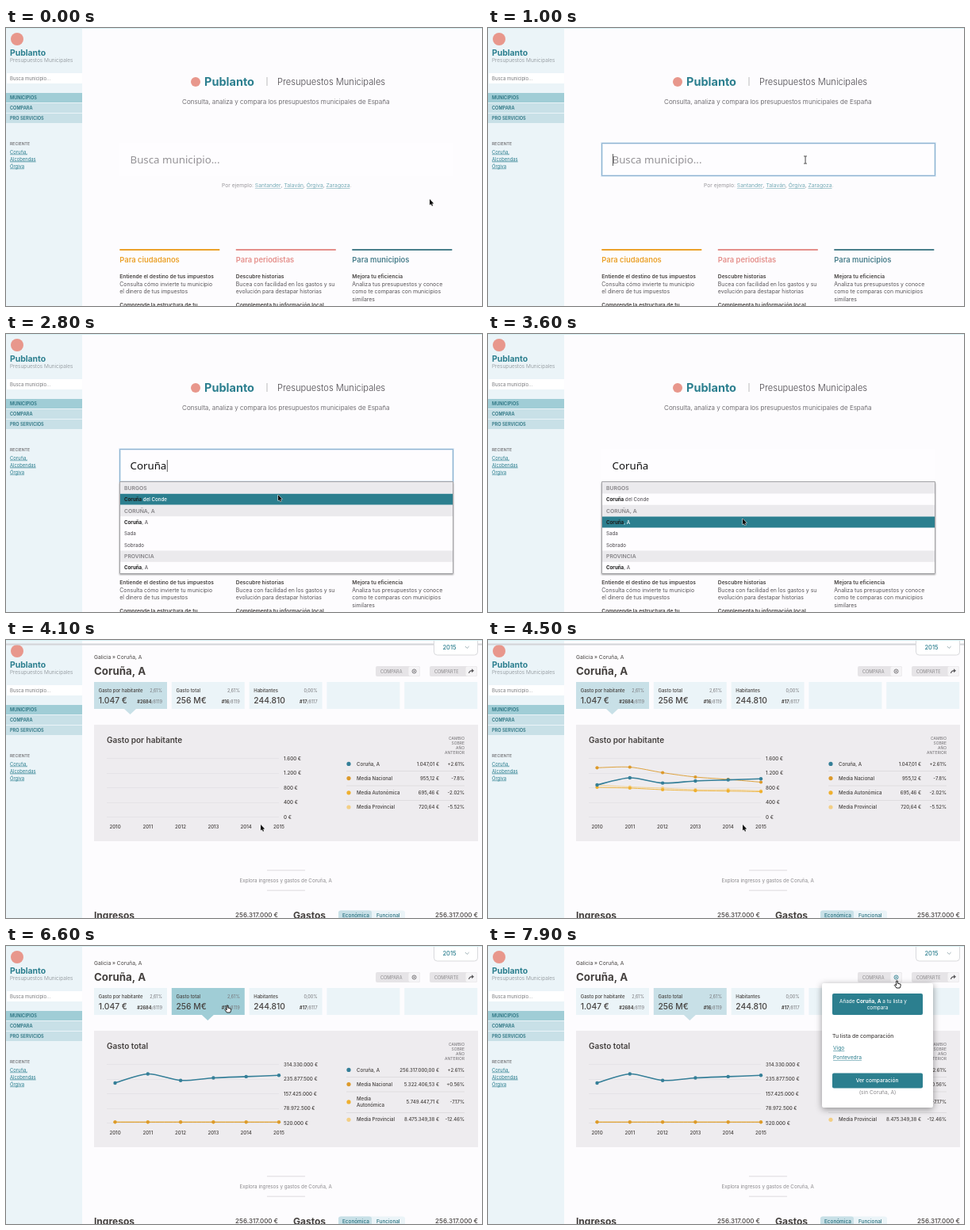
Write an HTML page with a canvas that moves like this. It is 600 px wide and 351 px high and loops after 8 s.

```html
<!DOCTYPE html>
<html lang="es">
<head>
<meta charset="utf-8">
<title>Presupuestos Municipales</title>
<style>
html, body { margin: 0; width: 600px; height: 351px; overflow: hidden; background: #fdfcfe; }
canvas { display: block; }
</style>
</head>
<body>
<canvas id="stage" width="600" height="351"></canvas>
<script>
const ctx = document.getElementById('stage').getContext('2d');
const LOOP = 8000;
const BRAND = 'Publanto';
const TEAL = '#2c7f8f', INK = '#45413f', GRAY = '#8b898c', PALE = '#ebf4f8', MID = '#c8e0e7', STRONG = '#a0cdd6';
const SERIES = ['#357f98', '#dc9a2b', '#efb02f', '#f3cf85'];
const FOCUS = 1000, LIST = 2500, PICK = 3600, CLOSE = 3700, PAGE = 4100, CHART = 4300, SWITCH = 5900, POPUP = 7800;
const TYPING = [1500, 1700, 1900, 2000, 2150, 2300];

function rect(x, y, w, h, color, radius = 0) {
  ctx.fillStyle = color;
  ctx.beginPath();
  ctx.roundRect(x, y, w, h, radius);
  ctx.fill();
}

function frame(x, y, w, h, color, width = 1, radius = 0) {
  ctx.strokeStyle = color;
  ctx.lineWidth = width;
  ctx.beginPath();
  ctx.roundRect(x, y, w, h, radius);
  ctx.stroke();
}

function dot(x, y, r, color) {
  ctx.fillStyle = color;
  ctx.beginPath();
  ctx.arc(x, y, r, 0, 7);
  ctx.fill();
}

function path(points, close) {
  ctx.beginPath();
  points.forEach(([x, y]) => ctx.lineTo(x, y));
  if (close) ctx.closePath();
}

// y is the visual middle of the capitals; returns the text width
function text(str, x, y, size, color = INK, weight = 400, align = 'left', family = 'Inter') {
  ctx.font = `${weight} ${size}px "${family}", sans-serif`;
  ctx.fillStyle = color;
  ctx.textAlign = align;
  ctx.fillText(str, x, y + size * 0.36);
  return ctx.measureText(str).width;
}

function link(str, x, y, size, color = TEAL) {
  const w = text(str, x, y, size, color);
  rect(x, y + size * 0.52, w, 0.6, color);
  return w;
}

function sidebar() {
  rect(0, 0, 96, 351, PALE);
  dot(14, 14, 8, '#e8978c');
  text(BRAND, 5, 31, 10.4, TEAL, 700);
  text('Presupuestos Municipales', 5, 41, 6.5, '#858b90', 300);
  rect(1, 57, 95, 13, '#fff');
  text('Busca municipio...', 5, 64, 5.95, '#77787b');
  ['MUNICIPIOS', 'COMPARA', 'PRO SERVICIOS'].forEach((label, i) => {
    rect(0, 82 + i * 13, 96, 12, i ? MID : STRONG);
    text(label, 5, 88.3 + i * 13, 5.6, '#27717f', 600);
  });
  text('RECIENTE', 5, 146, 5.1, '#747477', 600);
  ['Coruña,', 'Alcobendas', 'Órgiva'].forEach((s, i) => link(s, 5, 156.5 + i * 9, 5.85));
}

function hero() {
  dot(239, 68, 6, '#e8978c');
  text(BRAND, 250, 68, 14.5, TEAL, 700);
  rect(328.5, 62, 1, 11, '#bbb');
  text('Presupuestos Municipales', 342, 67.5, 11.15, '#4c494e', 300);
  text('Consulta, analiza y compara los presupuestos municipales de España', 222, 93, 8.08, '#4c494e', 300);
  let x = 272;
  x += text('Por ejemplo: ', x, 198.5, 6.75, '#9a989c');
  ['Santander', 'Talaván', 'Órgiva', 'Zaragoza'].forEach((s, i) => {
    x += link(s, x, 198.5, 6.75, '#74aab5');
    x += text(i < 3 ? ', ' : '.', x, 198.5, 6.75, '#9a989c');
  });
}

function columns() {
  [
    ['#eba22b', 'Para ciudadanos', 'Entiende el destino de tus impuestos',
      ['Consulta cómo invierte tu municipio', 'el dinero de tus impuestos'], 'Comprende la estructura de tu'],
    ['#e58f8b', 'Para periodistas', 'Descubre historias',
      ['Bucea con facilidad en los gastos y su', 'evolución para destapar historias'], 'Complementa tu información local'],
    ['#4a7f8c', 'Para municipios', 'Mejora tu eficiencia',
      ['Analiza tus presupuestos y conoce', 'como te comparas con municipios', 'similares'], '']
  ].forEach(([color, title, lead, lines, next], i) => {
    const x = 143.3 + i * 146.5;
    rect(x, 279, 126, 2, color);
    text(title, x, 293, 9.4, color, 600);
    text(lead, x, 314, 6.7, INK, 600);
    lines.forEach((s, k) => text(s, x, 323.5 + k * 9.4, 6.9, '#565356'));
    text(next, x, 349.5, 6.7, INK, 600);
  });
}

function searchBox(t) {
  const focused = t >= FOCUS && t < PICK;
  rect(143, 145, 421, 42, '#fefdff');
  if (focused) {
    frame(143.5, 145.5, 420, 41, '#d3e4f3', 2.6);
    frame(143.5, 145.5, 420, 41, '#8fb3d0', 1);
  }
  const typed = 'Coruña'.slice(0, TYPING.filter(at => t >= at).length);
  const shown = typed || 'Busca municipio...';
  const w = text(shown, 156.5, 166.5, 13.3, typed ? '#111' : '#949296', 400, 'left', 'Noto Sans');
  if (focused) rect(157 + (typed ? w : 0), 159, 0.8, 15, '#333');
}

function suggestions(t) {
  const rows = [['BURGOS'], ['Coruña', ' del Conde'], ['CORUÑA, A'], ['Coruña', ', A'],
    ['', 'Sada'], ['', 'Sobrado'], ['PROVINCIA'], ['Coruña', ', A']];
  const hovered = t < 3050 ? 1 : 3, step = 14.4;
  ctx.save();
  ctx.shadowColor = '#0006';
  ctx.shadowBlur = 2;
  ctx.shadowOffsetY = 1;
  rect(143, 187, 421, 116, '#fefdff');
  ctx.restore();
  rows.forEach(([head, tail], i) => {
    const y = 187 + i * step, mid = y + 7.3;
    if (tail === undefined) {
      rect(143, y, 421, step, '#ebeaed');
      text(head, 149, mid, 6.8, '#858387', 600);
      return;
    }
    if (i === hovered) rect(143, y + 0.4, 421, step - 0.4, TEAL);
    const w = text(head, 149, mid, 6.2, '#1c1c1c', 700);
    text(tail, 149 + w, mid, 6.2, i === hovered ? '#fff' : '#5f5c60', 500);
  });
  frame(143.5, 186.5, 420, 116, '#a2a2a5');
}

function searchPage(t) {
  hero();
  columns();
  searchBox(t);
  if (t >= LIST && t < CLOSE) suggestions(t);
}

function card(i, active, hovered, data) {
  const x = 111 + i * 97.8;
  rect(x, 53, 92, 34, active ? (hovered ? STRONG : MID) : PALE);
  if (active) {
    ctx.fillStyle = hovered ? STRONG : MID;
    path([[x + 38, 87], [x + 53, 87], [x + 45.5, 94]], true);
    ctx.fill();
  }
  if (!data) return;
  const [label, change, value, rank, total] = data;
  text(label, x + 5.7, 63.5, 5.95, INK, 500);
  text(change, x + 86, 64, 5.5, '#77767a', 400, 'right');
  text(value, x + 5.7, 76, 10.3, INK, 500);
  const w = text(total, x + 86, 78, 5.6, '#77767a', 400, 'right');
  text(rank, x + 86 - w, 78, 5.6, INK, 700, 'right');
}

function curve(ys, color, width, r) {
  const p = ys.map((y, i) => [137.5 + i * 41.3, y]);
  ctx.strokeStyle = color;
  ctx.lineWidth = width;
  ctx.beginPath();
  ctx.moveTo(...p[0]);
  for (let i = 0; i < p.length - 1; i++) {
    const a = p[Math.max(i - 1, 0)], b = p[i], c = p[i + 1], d = p[Math.min(i + 2, p.length - 1)], k = 0.14;
    ctx.bezierCurveTo(b[0] + (c[0] - a[0]) * k, b[1] + (c[1] - a[1]) * k,
      c[0] - (d[0] - b[0]) * k, c[1] - (d[1] - b[1]) * k, ...c);
  }
  ctx.stroke();
  p.forEach(([x, y]) => dot(x, y, r, color));
}

function chart(total, t) {
  rect(111, 107, 484, 147, '#eeecef');
  text(total ? 'Gasto total' : 'Gasto por habitante', 127, 126.5, 10, INK, 600);
  const ticks = total
    ? ['314.330.000 €', '235.877.500 €', '157.425.000 €', '78.972.500 €', '520.000 €']
    : ['1.600 €', '1.200 €', '800 €', '400 €', '0 €'];
  ticks.forEach((s, i) => {
    const y = 149.5 + i * 18.5;
    rect(127, y, 217, 0.6, '#dddbdf');
    text(s, 350, y, 6.2, INK, 500);
  });
  for (let i = 0; i < 6; i++) text(2010 + i, 137.5 + i * 41.3, 235.5, 6.1, INK, 500, 'center');
  if (t < CHART) return;
  const flat = Array(6).fill(222.3);
  const lines = total
    ? [[173, 161.5, 169.7, 166.5, 164.9, 163.3], flat, flat]
    : [[183, 174, 180.6, 178, 176.6, 175.3], [161.3, 160.5, 167.5, 173, 176, 179.5],
      [186, 187, 189, 190.2, 190.7, 191.5], [183, 185.5, 187, 189, 189, 190.5]];
  for (let i = lines.length - 1; i >= 0; i--) curve(lines[i], SERIES[i], i ? 0.9 : 1.6, i ? 2.1 : 2.2);
}

function legend(total) {
  ['CAMBIO', 'SOBRE', 'AÑO', 'ANTERIOR'].forEach((s, i) =>
    text(s, 578, 124 + i * 6.1, 5, '#6f6d70', 400, 'right'));
  const rows = total
    ? [['Coruña, A', '256.317.000,00 €', '+2.61%'], ['Media Nacional', '5.322.406,53 €', '+0.56%'],
      ['Media|Autonómica', '5.749.447,71 €', '-7.17%'], ['Media Provincial', '8.475.349,38 €', '-12.46%']]
    : [['Coruña, A', '1.047,01 €', '+2.61%'], ['Media Nacional', '955,12 €', '-7.8%'],
      ['Media Autonómica', '695,46 €', '-2.02%'], ['Media Provincial', '720,64 €', '-5.52%']];
  let top = 147.3;
  rows.forEach(([name, value, change], i) => {
    const parts = name.split('|'), h = parts.length > 1 ? 26.5 : 18.2, y = top + h / 2;
    if (i) rect(429, top, 149, 0.6, '#cfcdd0');
    dot(432, y, 2.6, SERIES[i]);
    parts.forEach((s, k) => text(s, 442, y + (k - (parts.length - 1) / 2) * 8.6, 6.1, INK, 500));
    text(value, 546, y, 6, INK, 500, 'right');
    text(change, 578, y, 6, INK, 500, 'right');
    top += h;
  });
}

function buttons(open) {
  [[466, 41, 'COMPARA'], [534, 45, 'COMPARTE']].forEach(([x, w, label]) => {
    rect(x, 33, w + 15, 13, '#e6e4e7', 2);
    rect(x + w + 0.5, 33.5, 14, 12, '#f5f4f6', 2);
    text(label, x + 6, 39.7, 5.5, GRAY);
  });
  const color = open ? TEAL : '#6b696c';
  ctx.strokeStyle = color;
  ctx.lineWidth = 0.9;
  ctx.beginPath();
  ctx.arc(514.5, 39.5, 2.5, 0, 7);
  ctx.stroke();
  dot(514.5, 39.5, 0.9, color);
  ctx.strokeStyle = '#5b595c';
  ctx.lineWidth = 1.2;
  ctx.beginPath();
  ctx.moveTo(583.5, 42);
  ctx.quadraticCurveTo(584, 38.7, 588, 38.7);
  ctx.stroke();
  ctx.fillStyle = '#5b595c';
  path([[587, 36.3], [590, 38.7], [587, 41.2]], true);
  ctx.fill();
}

function popup() {
  ctx.save();
  ctx.shadowColor = '#0006';
  ctx.shadowBlur = 9;
  ctx.shadowOffsetY = 2;
  rect(421, 47, 140, 157, '#fff', 2);
  ctx.restore();
  rect(434, 60, 114, 27, TEAL, 2);
  const parts = [['Añade ', 400], ['Coruña, A', 700], [' a tu lista y', 400]];
  let x = 443;
  parts.forEach(([s, weight]) => { x += text(s, x, 69.5, 6.4, '#fff', weight); });
  text('compara', 491, 78, 6.4, '#fff', 400, 'center');
  text('Tu lista de comparación', 434, 113.5, 6.8, INK, 500);
  link('Vigo', 435, 128.5, 6.7);
  link('Pontevedra', 435, 141, 6.7);
  rect(434, 160.5, 114, 19, TEAL, 2);
  text('Ver comparación', 490.5, 170, 6.6, '#fff', 500, 'center');
  text('(sin Coruña, A)', 491, 184.5, 6.6, GRAY, 400, 'center');
}

function budgetPage(t) {
  const total = t >= SWITCH, open = t >= POPUP, overCard = t >= 5600 && t < 6950;
  if (t < 4900) rect(0, 4.5, 600, 2, '#d3d4d8');
  rect(539.5, -6, 55, 25, '#fff', 4);
  frame(539.5, -6, 55, 25, '#d9dadd', 1, 4);
  text('2015', 550.5, 9.3, 7.5, TEAL, 500);
  ctx.strokeStyle = '#8fa4ab';
  ctx.lineWidth = 0.9;
  path([[578.8, 8], [581.2, 10.4], [583.6, 8]]);
  ctx.stroke();

  text('Galicia » Coruña, A', 111, 22, 6.7);
  text('Coruña, A', 111, 39.5, 13.3, INK, 700);
  buttons(open);
  const cards = [
    ['Gasto por habitante', '2,61%', '1.047 €', '#2684', '/8119'],
    ['Gasto total', '2,61%', '256 M€', '#16', '/8119'],
    ['Habitantes', '0,00%', '244.810', '#17', '/8117']
  ];
  chart(total, t);
  for (let i = 0; i < 5; i++) card(i, i === +total, i === 1 && overCard, cards[i]);
  legend(total);

  rect(329, 290.5, 48, 0.8, '#d2d0d3');
  text('Explora ingresos y gastos de Coruña, A', 294.5, 303.5, 6.25, GRAY);
  rect(329, 315.8, 48, 0.8, '#d2d0d3');
  text('Ingresos', 111, 347.5, 12, INK, 700);
  text('256.317.000 €', 343, 347.5, 8, INK, 500, 'right');
  text('Gastos', 362, 347.5, 12, INK, 700);
  rect(419, 341.5, 84, 14, PALE, 3);
  rect(419, 341.5, 42, 14, MID, 3);
  text('Económica', 424, 348, 6.4, '#276f7d', 500);
  text('Funcional', 467, 348, 6.4, '#276f7d', 500);
  text('256.317.000 €', 595, 347.5, 8, INK, 500, 'right');
  if (open) popup();
}

const ROUTE = [[0, 534, 216], [100, 534, 216], [900, 400, 166], [2500, 400, 166], [2800, 343, 203],
  [3300, 321, 233], [5000, 321, 233], [5700, 279, 75], [6800, 279, 75], [7700, 515.5, 44], [LOOP, 515.5, 44]];

function pointerAt(t) {
  const i = ROUTE.findIndex(([at]) => at > t), [t0, x0, y0] = ROUTE[i - 1], [t1, x1, y1] = ROUTE[i];
  const u = (t - t0) / (t1 - t0), e = u * u * (3 - 2 * u);
  return [x0 + (x1 - x0) * e, y0 + (y1 - y0) * e];
}

function pointer(t) {
  if (t >= TYPING[0] && t < LIST) return;
  const [x, y] = pointerAt(t);
  const overInput = t < LIST && x < 563 && y < 187;
  const hand = (t >= 5600 && t < 6950) || t >= 7650;
  ctx.save();
  ctx.translate(x, y);
  ctx.lineJoin = 'round';
  ctx.lineWidth = 1;
  if (overInput) {
    rect(-0.4, -4, 0.9, 9, '#333');
    rect(-2, -4.5, 4, 0.8, '#333');
    rect(-2, 4.7, 4, 0.8, '#333');
  } else if (hand) {
    path([[-0.8, 0], [0.8, 0], [1, 3.2], [4.6, 4.2], [4.6, 6.5], [3.6, 9], [-0.6, 9], [-3.2, 5.4], [-2.5, 4.6], [-0.8, 5.8]], true);
    ctx.fillStyle = '#fff';
    ctx.strokeStyle = '#222';
    ctx.fill();
    ctx.stroke();
  } else {
    path([[0, 0], [0, 7.6], [1.7, 6.2], [2.9, 8.8], [4.1, 8.2], [3, 5.7], [5.2, 5.5]], true);
    ctx.strokeStyle = '#fff';
    ctx.fillStyle = '#111';
    ctx.stroke();
    ctx.fill();
  }
  ctx.restore();
}

function draw(now) {
  const t = now % LOOP;
  rect(0, 0, 600, 351, '#fdfcfe');
  sidebar();
  if (t < PAGE) searchPage(t);
  else budgetPage(t);
  rect(0, 0, 600, 1, '#d8f1f4');
  pointer(t);
}

const start = performance.now();
function tick() {
  draw(performance.now() - start);
  requestAnimationFrame(tick);
}
tick();
</script>
</body>
</html>
```
